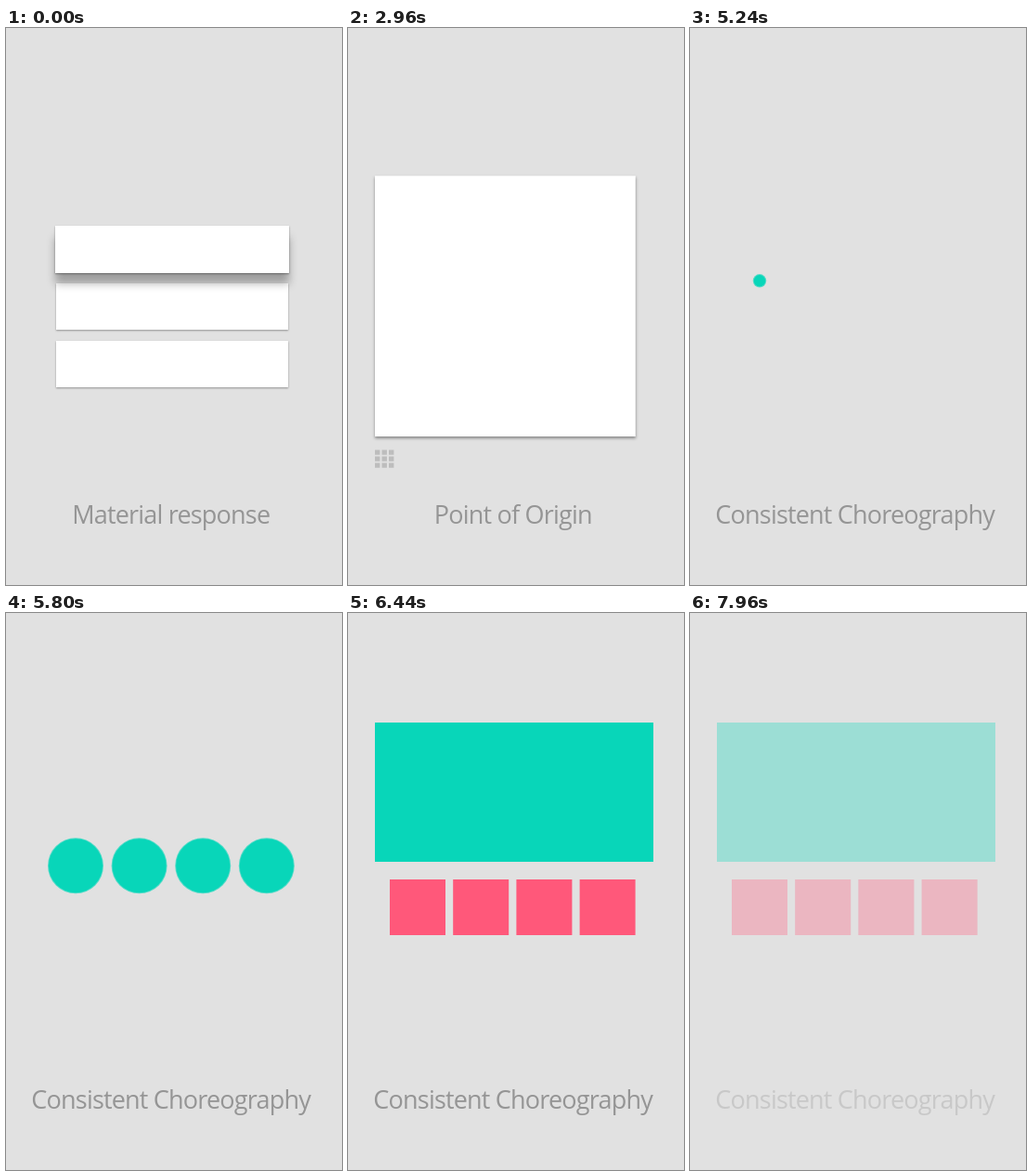
An HTML page with a canvas for the animation above (8000 ms loop, 362x600 px).

```html
<!DOCTYPE html>
<html lang="en">
<head>
<meta charset="utf-8">
<title>Motion principles</title>
<style>
  html, body { margin: 0; width: 100%; height: 100%; overflow: hidden; background: #e1e1e1; }
  canvas { display: block; }
</style>
</head>
<body>
<canvas id="stage" width="362" height="600"></canvas>
<script>
const ctx = document.getElementById('stage').getContext('2d');
const LOOP = 8000, TEAL = '#08d6b9', PINK = '#ff587a';

const clamp = v => Math.min(1, Math.max(0, v));
const mix = (a, b, k) => a + (b - a) * k;
const inOut = p => p < .5 ? 2 * p * p : 1 - 2 * (1 - p) ** 2;
const out = p => 1 - (1 - p) ** 2;
// Eased progress of time t between two moments
const span = (t, from, to, ease = inOut) => ease(clamp((t - from) / (to - from)));

function rect(x, y, w, h, color) {
  ctx.fillStyle = color;
  ctx.fillRect(x, y, w, h);
}

function shadow(dy, blur, alpha) {
  ctx.shadowColor = `rgba(0,0,0,${alpha})`;
  ctx.shadowOffsetY = dy;
  ctx.shadowBlur = blur;
}

// White paper; lift 0 lies flat, lift 1 is raised
function paper(x, y, w, h, lift = 0, rest = [1, 2, .36]) {
  ctx.save();
  if (lift > 0) {
    shadow(12 * lift, 2 + 7 * lift, .3 * lift);
    rect(x, y, w, h, '#fff');
  }
  shadow(...rest);
  rect(x, y, w, h, '#fff');
  ctx.restore();
}

// Disc with a soft rim
function disc(x, y, r) {
  ctx.beginPath();
  ctx.arc(x, y, r, 0, 7);
  ctx.fillStyle = TEAL;
  ctx.fill();
  ctx.strokeStyle = 'rgba(225,225,225,.35)';
  ctx.lineWidth = 2;
  ctx.stroke();
}

function caption(text, alpha) {
  if (alpha <= 0) return;
  ctx.globalAlpha = alpha;
  ctx.fillStyle = '#959595';
  ctx.fillText(text, 177.7, 533.5);
  ctx.globalAlpha = 1;
}

function response(t) {
  const alpha = 1 - span(t, 1080, 1520);
  if (alpha <= 0) return;
  const lift = 1 - span(t, 0, 560);
  ctx.globalAlpha = alpha;
  paper(54, 337, 250, 50);
  paper(54, 275, 250, 50);
  paper(54 - lift, 213, 250 + 2 * lift, 50 + lift, lift);
  ctx.globalAlpha = 1;
}

function origin(t) {
  const alpha = span(t, 1940, 2360) - span(t, 4440, 4840);
  if (alpha > 0) {
    const press = 1 - .15 * Math.sin(Math.PI * clamp((t - 2440) / 200));
    ctx.save();
    ctx.globalAlpha = alpha;
    ctx.translate(39.5, 464);
    ctx.scale(press, press);
    for (let i = 0; i < 9; i++)
      rect(-10.5 + 7.5 * (i % 3), -9.5 + 7 * Math.floor(i / 3), 5.4, 5.2, '#bdbdbd');
    ctx.restore();
  }
  const size = 300 * (span(t, 2480, 3124, out) - span(t, 3600, 4000));
  if (size > .5) paper(29, 440 - size, size, size, 0, [2, 3, .4]);
}

function choreography(t) {
  ctx.globalAlpha = 1 - span(t, 7720, 8120);

  // Dots pop in one after another, then gather into the banner
  const gather = span(t, 5810, 6060);
  if (gather < 1) {
    for (let i = 0; i < 4; i++) {
      const r = 30 * span(t, 5200 + i * 90, 5520 + i * 90, out);
      if (r > 0) disc(mix(75 + 68.6 * i, 179, gather), mix(272.3, 193, gather), r);
    }
  }
  const grow = span(t, 5820, 6440, out);
  rect(179 - 150 * grow, 193 - 75 * grow, 300 * grow, 150 * grow, TEAL);

  const rise = span(t, 6000, 6440);
  ctx.globalAlpha *= clamp(rise * 2);
  for (let i = 0; i < 4; i++)
    rect(45 + 68.2 * i, mix(363, 287, rise), 60, 60, PINK);
  ctx.globalAlpha = 1;
}

function draw(now) {
  const t = now % LOOP;
  rect(0, 0, 362, 600, '#e1e1e1');
  ctx.font = '27px "Open Sans", sans-serif';
  ctx.letterSpacing = '-0.8px';
  ctx.textAlign = 'center';

  response(t);
  origin(t);
  if (t > 5200) choreography(t);

  const second = span(t, 1080, 1520), third = span(t, 4440, 4840);
  caption('Material response', 1 - second);
  caption('Point of Origin', second - third);
  caption('Consistent Choreography', third - span(t, 7720, 8120));
}

const start = performance.now();
(function frame() {
  draw(performance.now() - start);
  requestAnimationFrame(frame);
})();
</script>
</body>
</html>
```
